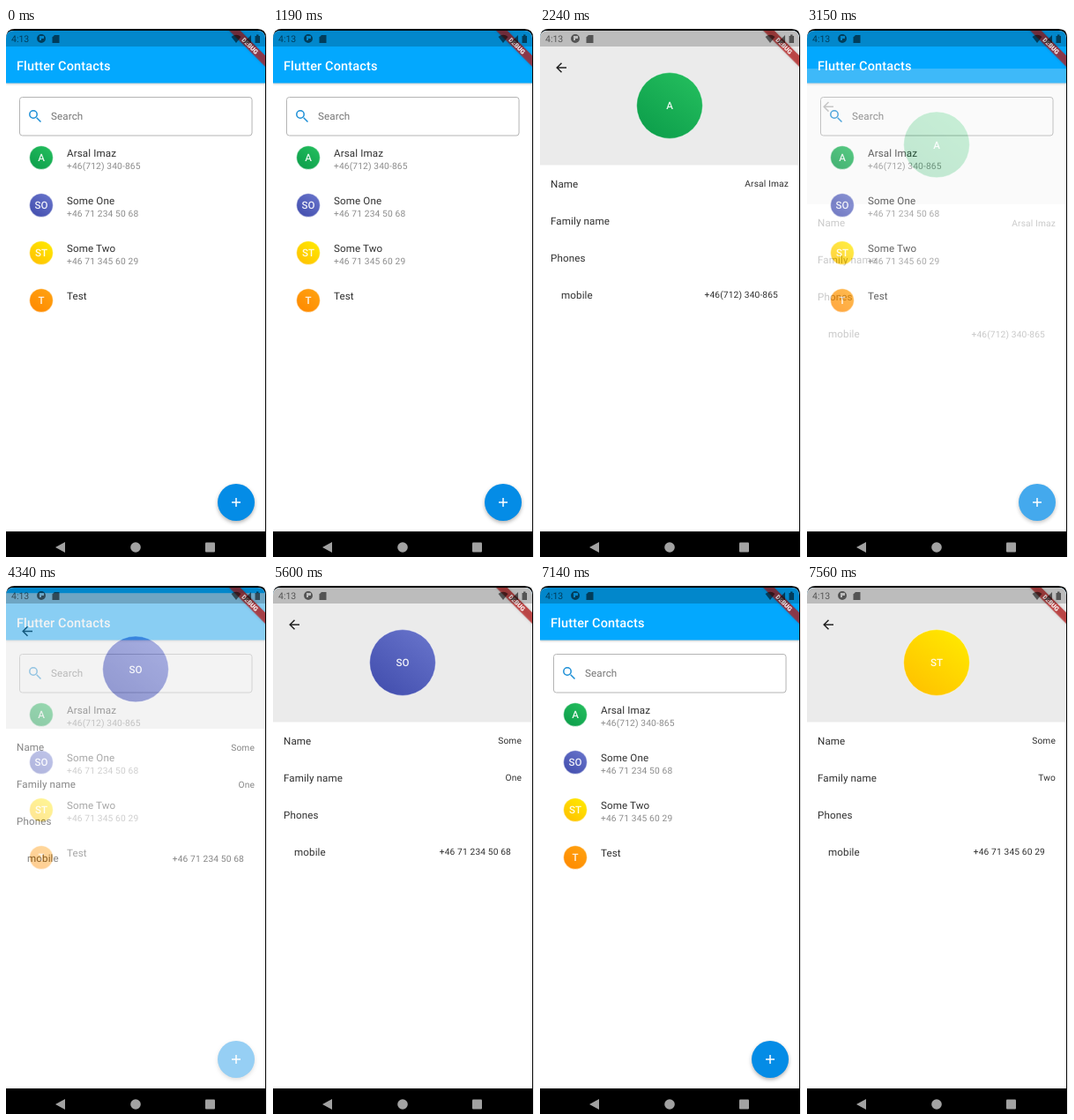
An HTML page for the animation above (8 s loop, 296 px wide and 600 px high).

```html
<!DOCTYPE html>
<html lang="en">
<head>
<meta charset="utf-8">
<title>Contacts</title>
<style>
  html, body { margin: 0; width: 100%; height: 100%; overflow: hidden; background: #fff; }
  svg { display: block; font: 11.6px Roboto, sans-serif; letter-spacing: .12px; fill: #303030; text-rendering: geometricPrecision; }
  filter { color-interpolation-filters: sRGB; }
  .small { font-size: 10.2px; letter-spacing: .15px; }
  .muted { fill: #8c8c8c; }
  .end { text-anchor: end; }
  .initials { fill: #fff; fill-opacity: .9; font-weight: 500; text-anchor: middle; letter-spacing: 0; }
  .line { fill: none; stroke-width: 1.5; }
</style>
</head>
<body>
<svg width="296" height="600" viewBox="0 0 296 600">
  <defs id="defs">
    <clipPath id="screen"><path d="M0 571V12Q0 3 9 3H285Q294 3 294 12V571Z"/></clipPath>
    <filter id="shadow" x="-30%" y="-30%" width="160%" height="170%">
      <feDropShadow dx="0" dy="2" stdDeviation="2" flood-opacity=".3"/>
    </filter>
    <filter id="faint" x="-5%" y="-30%" width="110%" height="170%">
      <feDropShadow dx="0" dy="1" stdDeviation="1" flood-opacity=".22"/>
    </filter>
    <filter id="soft" x="-30%" y="-80%" width="160%" height="260%">
      <feDropShadow dx="0" dy="0" stdDeviation="1.500" flood-opacity=".25"/>
    </filter>
  </defs>
  <path d="M0 600V10Q1 1 10 1H285Q295 1 295 11V600Z" fill="#000"/>
  <g clip-path="url(#screen)">
    <rect width="296" height="571" fill="#fff"/>
    <rect y="2" width="296" height="60.500" fill="#03a8fe" filter="url(#faint)"/>
    <text x="12" y="47.700" style="font-size:14.5px;font-weight:500;letter-spacing:.15px" fill="#fff">Flutter Contacts</text>
    <rect x="15.500" y="78.500" width="263.500" height="43.500" rx="3" fill="none" stroke="#b4b4b4"/>
    <path class="line" d="M34.700 101.700L39.500 106.500" stroke="#1c8fd6"/>
    <circle class="line" cx="31" cy="98" r="4.200" stroke="#1c8fd6"/>
    <text x="51" y="104" fill="#757575">Search</text>
    <g id="list"></g>
    <circle cx="261" cy="538" r="21" fill="#048ce6" filter="url(#shadow)"/>
    <path class="line" d="M256 538H266M261 533V543" stroke="#fff"/>

    <g id="detail"></g>

    <g transform="translate(294 3) rotate(45)">
      <rect x="-34" y="20" width="68" height="8.800" fill="#b71c1c" fill-opacity=".75" filter="url(#soft)"/>
      <text y="27" text-anchor="middle" fill="#fff" style="font-size:7.2px;font-weight:900;letter-spacing:0">DEBUG</text>
    </g>
    <rect width="296" height="21" fill-opacity=".2" fill="#000"/>
    <g fill="#000" fill-opacity=".55">
      <text x="6" y="16.200" style="font-size:10.5px;letter-spacing:0">4:13</text>
      <path fill-rule="evenodd" d="M35 12a5 5 0 1 1 10 0a5 5 0 1 1 -10 0M38 9V14H40V12H43V9Z"/>
      <path d="M55 8H60.500V17H52.500V10.500Z"/>
      <path d="M255.500 10Q261 5.500 266.500 10L261 17Z"/>
      <path d="M269 17L278 8V17Z"/>
      <path d="M282.500 9H284V7.500H286.500V9H288V17H282.500Z"/>
    </g>
  </g>
  <g fill="#a2a2a2">
    <path d="M56 589L67 583V595Z"/>
    <circle cx="147" cy="589" r="5.800"/>
    <rect x="226" y="583.500" width="11" height="11" rx="1"/>
  </g>
</svg>
<script>
const LOOP = 8000, DURATION = 300, SLIDE = 142;
const contacts = [
  { initials: 'A', name: 'Arsal Imaz', phone: '+46(712) 340-865', colors: ['#22bb5c', '#0ea04c'] },
  { initials: 'SO', name: 'Some', family: 'One', phone: '+46 71 234 50 68', colors: ['#6470c8', '#4551b0'] },
  { initials: 'ST', name: 'Some', family: 'Two', phone: '+46 71 345 60 29', colors: ['#ffe600', '#ffc400'] },
  { initials: 'T', name: 'Test', colors: ['#ffa010', '#ff8b00'] }
];
const visits = [
  { contact: 0, open: 1630, close: 2983 },
  { contact: 1, open: 4125, close: 5783 },
  { contact: 2, open: 7225, close: Infinity }
];
const byId = id => document.getElementById(id);
const text = (x, y, value = '', cls = '') => `<text x="${x}" y="${y}" class="${cls}">${value}</text>`;
const avatar = (i, x, y, r) =>
  `<circle cx="${x}" cy="${y}" r="${r}" fill="url(#tint${i})" stroke="#fff" stroke-opacity=".4"/>` +
  text(x, y + 4.2, contacts[i].initials, 'initials');

byId('defs').innerHTML += contacts.map(({ colors: [light, dark] }, i) =>
  `<linearGradient id="tint${i}" x1=".8" y1=".1" x2=".2" y2=".9">
    <stop stop-color="${light}"/><stop offset="1" stop-color="${dark}"/></linearGradient>`).join('');

byId('list').innerHTML = contacts.map(({ name, family, phone }, i) => {
  const y = 147 + 54 * i;
  return avatar(i, 40, y, 13.3) + text(69, y - 1.4, family ? `${name} ${family}` : name) +
    text(69, y + 13.4, phone, 'small muted');
}).join('');

const detailPage = i => {
  const { name, family, phone } = contacts[i];
  return `<rect y="2" width="296" height="600" fill="#fff"/>
    <rect y="2" width="296" height="153.500" fill="#ebebeb"/>
    <path class="line" d="M30 45H19.500M24.500 39.700L19.200 45L24.500 50.300" stroke="#222"/>` +
    avatar(i, 147, 88, 37.4) +
    text(12, 180.5, 'Name') + text(282, 180.3, name, 'small end') +
    text(12, 222.5, 'Family name') + text(282, 222.3, family, 'small end') +
    text(12, 264.5, 'Phones') +
    text(24, 306.5, 'mobile') + text(270, 306.3, phone, 'small end');
};

function cubicBezier(x1, y1, x2, y2) {
  const at = (a, b, s) => 3 * a * s * (1 - s) ** 2 + 3 * b * s * s * (1 - s) + s ** 3;
  return x => {
    let low = 0, high = 1;
    for (let n = 0; n < 24; n++) {
      const mid = (low + high) / 2;
      if (at(x1, x2, mid) < x) low = mid; else high = mid;
    }
    return at(y1, y2, (low + high) / 2);
  };
}
const fastOutSlowIn = cubicBezier(.4, 0, .2, 1);
const easeIn = cubicBezier(.42, 0, 1, 1);
const clamp = v => Math.min(1, Math.max(0, v));

const detail = byId('detail');
let shown;
function draw(now) {
  const time = now % LOOP;
  const visit = visits.find(v => time < v.close + DURATION);
  const progress = Math.min(clamp((time - visit.open) / DURATION), 1 - clamp((time - visit.close) / DURATION));
  if (shown !== visit.contact) {
    shown = visit.contact;
    detail.innerHTML = detailPage(shown);
  }
  detail.setAttribute('display', progress ? 'inline' : 'none');
  detail.setAttribute('opacity', easeIn(progress));
  detail.setAttribute('transform', `translate(0 ${SLIDE * (1 - fastOutSlowIn(progress))})`);
}
const start = performance.now();
function frame() {
  draw(performance.now() - start);
  requestAnimationFrame(frame);
}
frame();
</script>
</body>
</html>
```
